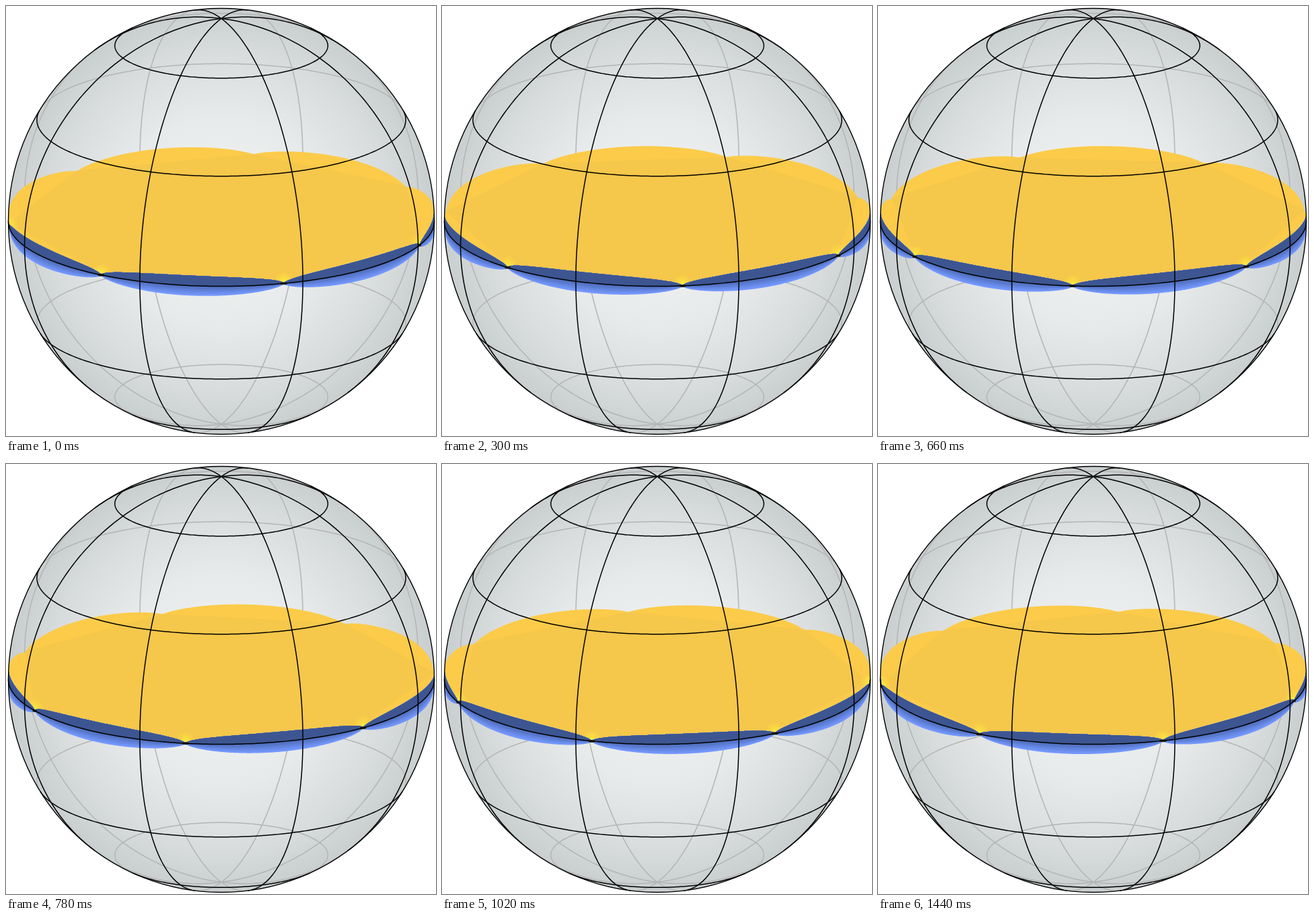
These frames come from a looping animation (636x636 px, 1.5 s). An HTML page with a canvas:

```html
<!DOCTYPE html>
<html>
<head>
<meta charset="utf-8">
<style>
html, body { margin: 0; width: 100%; height: 100%; overflow: hidden; background: #fff; }
canvas { display: block; }
</style>
</head>
<body>
<canvas id="stage" width="636" height="636"></canvas>
<script>
const ctx = document.getElementById('stage').getContext('2d');
const C = 318.5, R = 315, DEG = Math.PI / 180;
const SIN = 0.305, COS = Math.sqrt(1 - SIN * SIN);
const LOBES = 7, STEP = 360 / LOBES, RISE = 2.85;
const LOOP = 1500, TICK = 60;

// Orthographic view of a point on the sphere; longitude 0 faces the viewer.
function project(lat, lon) {
  const a = lat * DEG, b = lon * DEG;
  const up = Math.sin(a), out = Math.cos(a) * Math.cos(b);
  return {
    x: C + R * Math.cos(a) * Math.sin(b),
    y: C - R * (up * COS - out * SIN),
    depth: up * SIN + out * COS
  };
}

function range(from, to, step) {
  const n = Math.round(Math.abs(to - from) / step);
  return Array.from({ length: n + 1 }, (_, i) => from + (to - from) * i / n);
}

function trace(points) {
  ctx.beginPath();
  for (const p of points) ctx.lineTo(p.x, p.y);
}

function fill(points, color) {
  trace(points);
  ctx.fillStyle = color;
  ctx.fill();
}

// Strokes only the part of a curve on the near (side 1) or far (side -1) half.
function strokeSide(points, side) {
  let drawing = false;
  ctx.beginPath();
  for (const p of points) {
    const shown = p.depth * side >= -0.003;
    if (shown) drawing ? ctx.lineTo(p.x, p.y) : ctx.moveTo(p.x, p.y);
    drawing = shown;
  }
  ctx.stroke();
}

const around = range(-180, 180, 1);
const grid = [
  ...[-60, -30, 0, 30, 60].map(lat => around.map(lon => project(lat, lon))),
  ...range(-157.5, 157.5, 45).map(lon => range(-90, 90, 1).map(lat => project(lat, lon)))
];

function drawGrid(side, color) {
  ctx.strokeStyle = color;
  ctx.lineWidth = 1.5;
  for (const line of grid) strokeSide(line, side);
}

function drawBall() {
  const shade = ctx.createRadialGradient(C, C, 0, C, C, R);
  shade.addColorStop(0, '#f4f5f5');
  shade.addColorStop(0.5, '#e7eaea');
  shade.addColorStop(0.8, '#d8dcdc');
  shade.addColorStop(1, '#c9cecf');
  ctx.beginPath();
  ctx.arc(C, C, R, 0, 2 * Math.PI);
  ctx.fillStyle = shade;
  ctx.fill();
}

function drawDisc(cusp) {
  const rim = lon => {
    const s = (((lon - cusp) / STEP) % 1 + 1) % 1;
    return RISE * (4 * s * (1 - s)) ** 0.55;
  };
  const top = lon => Math.hypot(rim(lon), 0.3 * RISE * Math.max(0, -Math.cos(lon * DEG)));
  const front = range(-91, 91, 0.25);
  const band = (from, to, color) => fill([
    ...front.map(lon => project(rim(lon) * from, lon)),
    ...front.map(lon => project(rim(lon) * to, lon)).reverse()
  ], color);

  const body = range(-180, 180, 0.25).map(lon => project(top(lon), lon));
  fill(body, '#fccb49');

  const cusps = range(0, LOBES - 1, 1).map(i => cusp + i * STEP);
  fill(cusps.map(lon => project(0.3 * RISE, lon)), '#f5c74b');

  const nearCusps = cusps.map(lon => project(0, lon)).filter(p => p.depth > 0);
  ctx.save();
  trace(body);
  ctx.clip();
  for (const { x, y } of nearCusps) {
    const glow = ctx.createRadialGradient(x, y - 3, 0, x, y - 3, 15);
    glow.addColorStop(0, '#ffec3c');
    glow.addColorStop(1, '#ffdc4000');
    ctx.fillStyle = glow;
    ctx.fillRect(x - 15, y - 18, 30, 30);
  }
  ctx.restore();

  // The underside brightens from the equator down to the lower rim.
  for (const k of range(1, 0.125, 0.125)) {
    band(1, -k, `rgb(${74 + 43 * k}, ${104 + 49 * k}, ${178 + 77 * k})`);
  }
  band(1, 0, '#3d5692');

  ctx.fillStyle = '#2b2a1c';
  for (const p of nearCusps) {
    ctx.beginPath();
    ctx.ellipse(p.x, p.y, 5 * p.depth + 1, 2, 0, 0, 2 * Math.PI);
    ctx.fill();
  }
}

function draw(now) {
  const t = Math.floor(now % LOOP / TICK) * TICK;
  ctx.clearRect(0, 0, 636, 636);
  drawBall();
  drawGrid(-1, '#b4b5b5');
  drawDisc(17.05 - STEP * t / LOOP);
  drawGrid(1, '#000');
  ctx.lineWidth = 1.4;
  ctx.beginPath();
  ctx.arc(C, C, R, 0, 2 * Math.PI);
  ctx.stroke();
  requestAnimationFrame(draw);
}
requestAnimationFrame(draw);
</script>
</body>
</html>
```
